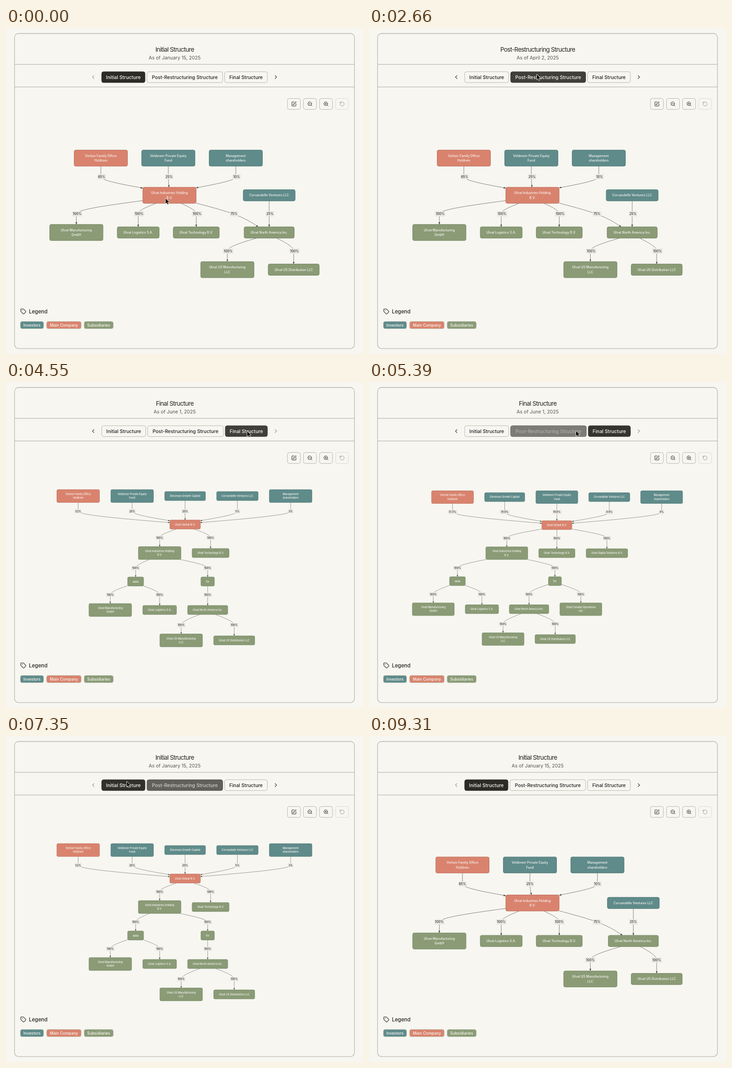
An HTML page that plays this animation: 783x715 px, repeating every 9.73 s.

```html
<!DOCTYPE html>
<html lang="en">
<head>
<meta charset="utf-8">
<title>Structure chart</title>
<style>
  html, body { margin: 0; height: 100%; overflow: hidden; background: #f7f6f1; }
  svg { display: block; width: 783px; height: 715px; font-family: Inter, sans-serif; }
  text { text-anchor: middle; }
  .icon { fill: none; stroke: #24231f; stroke-width: 2; stroke-linecap: round; stroke-linejoin: round; }
  .frame { fill: none; stroke: #b7b7ae; }
  .muted { opacity: .45; }
</style>
</head>
<body>
<svg id="stage" viewBox="0 0 783 715"></svg>
<script>
const LOOP = 9730, STEP = 70;
const PAPER = [247, 246, 241], INK = [45, 43, 38], BORDER = [183, 183, 174];
const TEAL = { fill: '#5f8b8a', edge: '#47736f' };
const CORAL = { fill: '#d9836e', edge: '#b8614d' };
const GREEN = { fill: '#8a9b76', edge: '#6c7f5a' };

const stage = document.getElementById('stage');
const $ = id => document.getElementById(id);

const text = (x, y, str, size, fill, extra = '') =>
  `<text x="${x}" y="${y + size * .364}" font-size="${size}" fill="${fill}" ${extra}>${str}</text>`;
const box = (x, y, w, h, r, extra) =>
  `<rect x="${x}" y="${y}" width="${w}" height="${h}" rx="${r}" ${extra}/>`;
const icon = (x, y, scale, body, extra = '') =>
  `<g class="icon" transform="translate(${x} ${y}) scale(${scale}) translate(-12 -12)" ${extra}>${body}</g>`;

// ---- charts ----
const NAMES = {
  family: 'Verloin Family Office|Holdrem',
  equity: 'Veldmeer Private Equity|Fund',
  growth: 'Elmorean Growth Capital',
  ventures: 'Corvandelle Ventures LLC',
  managers: 'Management|shareholders',
  global: 'Ulvat Global N.V.',
  holding: 'Ulvat Industries Holding|B.V.',
  making: 'Ulvat Manufacturing|GmbH',
  logistics: 'Ulvat Logistics S.A.',
  tech: 'Ulvat Technology B.V.',
  digital: 'Ulvat Digital Solutions B.V.',
  north: 'Ulvat North America Inc.',
  canada: 'Ulvat Canada Operations|Ltd.',
  usMaking: 'Ulvat US Manufacturing|LLC',
  usDist: 'Ulvat US Distribution LLC',
  aaaa: 'aaaa',
  for: 'for'
};
const INVESTORS = ['equity', 'growth', 'ventures', 'managers'];

// Rows hold "id centre [width]", links hold "from to percent [label x]".
const initial = (font, top, gap, nudge, shift, north) => ({
  font, top, gap, nudge, wide: 117, main: ['family', 'holding'], hub: 'holding',
  rows: [
    `family ${205 + shift}, equity ${353 + shift}, managers ${501 + shift}`,
    `holding 358.5, ventures ${north} 114`,
    `making 154.3, logistics 290 92, tech 417.3 101, north ${north} 110`,
    'usMaking 485.5, usDist 631 112'
  ],
  links: `family holding 65, equity holding 25, managers holding 10, holding making 100,
    holding logistics 100, holding tech 100, holding north 75 ${500 - nudge}, ventures north 25,
    north usMaking 100, north usDist 100`
});

const CHARTS = [
  initial(7, 267.7, 46.2, 1.7, 3, 577.2),
  {
    font: 5.6, top: 236, gap: 38.4, nudge: 0, wide: 93.5, main: ['family', 'global'], hub: 'global',
    rows: [
      'family 158.3, equity 276.7, growth 392.8 89.5, ventures 507.5 91, managers 624.3',
      'global 392.8 67',
      'holding 337, tech 448.7 81',
      'aaaa 284.3 35, for 442.3 29.5',
      'making 228.7, logistics 337 74, north 442.3 88',
      'usMaking 384.2, usDist 500.5 90'
    ],
    links: `family global 52, equity global 20, growth global 20, ventures global 5, managers global 3,
      global holding 100, global tech 100, holding aaaa 100, holding for 100, aaaa making 100,
      aaaa logistics 100, for north 100, north usMaking 100, north usDist 100`
  },
  {
    font: 5.5, top: 238.6, gap: 37.8, nudge: 0, wide: 92, main: ['family', 'global'], hub: 'global',
    rows: [
      'family 183.2, growth 297.6 88, equity 412, ventures 527 90, managers 641.8',
      'global 412 66',
      'holding 302.2, tech 412 79.5, digital 521.8 91',
      'aaaa 194 34.5, for 407.8 28.5',
      'making 141, logistics 247.6 73, north 351 86.5, canada 464.7',
      'usMaking 294, usDist 408.4 88.5'
    ],
    links: `family global 51.5, growth global 19.8, equity global 19.8, ventures global 4.9, managers global 4,
      global holding 100, global tech 100, global digital 100, holding aaaa 100, holding for 100,
      aaaa making 100, aaaa logistics 100, for north 100, for canada 100, north usMaking 100, north usDist 100`
  },
  initial(7, 265.2, 48, 0, 0, 579.8)
];

const split = list => list.split(',').map(item => item.trim().split(/\s+/));

function rim(node, p) {
  const dx = p.x - node.x, dy = p.y - node.y;
  const k = Math.min(node.w / 2 / Math.abs(dx || 1e-6), node.h / 2 / Math.abs(dy || 1e-6));
  return { x: node.x + dx * k, y: node.y + dy * k };
}

// Monotone cubic in y through three points.
function curve(a, b, c) {
  const h0 = b.y - a.y, h1 = c.y - b.y;
  const s0 = (b.x - a.x) / h0, s1 = (c.x - b.x) / h1;
  const mean = Math.abs(s0 * h1 + s1 * h0) / (h0 + h1);
  const mid = (Math.sign(s0) + Math.sign(s1)) * Math.min(Math.abs(s0), Math.abs(s1), mean / 2);
  const part = (p, q, h, m, n) =>
    `C${p.x + m * h / 3} ${p.y + h / 3} ${q.x - n * h / 3} ${q.y - h / 3} ${q.x} ${q.y}`;
  return `M${a.x} ${a.y}` + part(a, b, h0, (3 * s0 - mid) / 2, mid) + part(b, c, h1, mid, (3 * s1 - mid) / 2);
}

function drawChart(chart) {
  const { font, gap } = chart, nodes = {};
  let y = chart.top, boxes = '', lines = '', labels = '';
  for (const row of chart.rows) {
    const items = split(row);
    const height = id => font * (NAMES[id].includes('|') ? 5.05 : 3.55);
    const rowH = Math.max(...items.map(([id]) => height(id)));
    for (const [id, x, w] of items) {
      nodes[id] = { x: +x, y: y + rowH / 2, w: +w || chart.wide, h: height(id), top: y, bottom: y + rowH };
    }
    y += rowH + gap;
  }
  for (const [id, n] of Object.entries(nodes)) {
    const tone = chart.main.includes(id) ? CORAL : INVESTORS.includes(id) ? TEAL : GREEN;
    boxes += box(n.x - n.w / 2, n.y - n.h / 2, n.w, n.h, font * .5,
      `fill="${tone.fill}" stroke="${tone.edge}" stroke-width="${font * .12}"`);
    const parts = NAMES[id].split('|');
    parts.forEach((part, i) => {
      boxes += text(n.x, n.y + (i - (parts.length - 1) / 2) * font * 1.5, part, font, '#f8f7f2', 'font-weight="500"');
    });
  }
  for (const [from, to, percent, at] of split(chart.links)) {
    const a = nodes[from], b = nodes[to];
    const mid = { x: +at || (to === chart.hub ? a : b).x, y: (a.bottom + b.top) / 2 };
    lines += `<path d="${curve(rim(a, mid), mid, rim(b, mid))}" fill="none" stroke="#5b5a55"
      stroke-width="${font * .11}" marker-end="url(#tip)"/>`;
    const label = percent + '%', w = (label.length * .62 + .75) * font, x = mid.x + chart.nudge;
    labels += box(x - w / 2, mid.y - font * .82, w, font * 1.64, 0, 'fill="#eae9e3"') +
      text(x, mid.y, label, font, '#2f2e2a', 'font-weight="500"');
  }
  return `<g class="chart">${lines}${boxes}${labels}</g>`;
}

// ---- fixed parts ----
const HEADS = [
  ['Initial Structure', 'As of January 15, 2025', 97.5],
  ['Post-Restructuring Structure', 'As of April 2, 2025', 167],
  ['Final Structure', 'As of June 1, 2025', 94.8]
];
const LENS = '<circle cx="11" cy="11" r="8"/><path d="M21 21l-4.35-4.35M8 11h6"/>';
const TOOLS = [
  `<path d="M12 3H5a2 2 0 0 0-2 2v14a2 2 0 0 0 2 2h14a2 2 0 0 0 2-2v-7M18.375 2.625a1 1 0 0 1 3 3l-9.013 9.014a2 2 0 0 1-.853.505l-2.873.84a.5.5 0 0 1-.62-.62l.84-2.873a2 2 0 0 1 .506-.852z"/>`,
  LENS,
  LENS + '<path d="M11 8v6"/>',
  '<path d="M3 12a9 9 0 1 0 9-9 9.75 9.75 0 0 0-6.74 2.74L3 8M3 3v5h5"/>'
];
const CHIPS = [['Investors', 31.5, 51, TEAL], ['Main Company', 89, 76, CORAL], ['Subsidiaries', 171.3, 64, GREEN]];

stage.innerHTML = `
  <defs><marker id="tip" viewBox="0 0 10 10" refX="9.5" refY="5" markerWidth="6.5" markerHeight="6.5" orient="auto">
    <path d="M0 1L10 5L0 9z" fill="#4a4944"/></marker></defs>
  ${box(18.7, 12, 745.6, 691.2, 9, 'class="frame" stroke-width="1.3"')}
  <path class="frame" d="M19 79.7H764M19 129.4H764" stroke-width="1.2"/>
  ${text(370, 46.7, '', 13.5, '#24231f', 'id="title" letter-spacing="-.05em"')}
  ${text(370, 65.6, '', 10.5, '#55544f', 'id="date"')}
  ${icon(191.3, 107.7, .56, '<path d="M15 18l-6-6 6-6"/>', 'id="prev"')}
  ${icon(591.8, 107.7, .56, '<path d="M9 18l6-6-6-6"/>', 'id="next"')}
  ${box(208.4, 94.4, 98.4, 26.8, 5, 'id="ring" fill="none" stroke="#a3a299" stroke-width="2"')}
  ${HEADS.map(([name], i) => `<g id="tab${i}">${box(0, 95.9, 10, 23.8, 4, '')}${
    text(0, 107.7, name, 10.5, '#000', 'font-weight="500"')}</g>`).join('')}
  ${TOOLS.map((body, i) => `<g ${i === 3 ? 'class="muted"' : ''}>${
    box(617.3 + 35.2 * i, 154.6, 28.4, 24, 4, 'class="frame"')}${icon(631.5 + 35.2 * i, 166.6, .5, body)}</g>`).join('')}
  ${CHARTS.map(drawChart).join('')}
  ${icon(38, 621.6, .56, `<path d="M12.586 2.586A2 2 0 0 0 11.172 2H4a2 2 0 0 0-2 2v7.172a2 2 0 0 0 .586 1.414l8.704 8.704a2.426 2.426 0 0 0 3.42 0l6.58-6.58a2.426 2.426 0 0 0 0-3.42z"/><circle cx="7.5" cy="7.5" r=".6"/>`)}
  ${text(70.6, 621.5, 'Legend', 11.4, '#24231f', 'font-weight="500"')}
  ${CHIPS.map(([name, x, w, tone]) => box(x, 643.6, w, 16, 4, `fill="${tone.fill}" stroke="#bfc5b8"`) +
    text(x + w / 2, 651.6, name, 8.6, '#f8f7f2', 'font-weight="500"')).join('')}
  <path id="cursor" d="M0 0V11.2L2.6 8.8L4.3 12.8L6.3 12L4.6 8H8.2Z" fill="#111" stroke="#fff"
    stroke-width="1.5" stroke-linejoin="round" paint-order="stroke"/>`;

// ---- timeline ----
const PAGES = [[0, 0], [2450, 1], [4410, 2], [5810, 1], [7350, 0]];
const VIEWS = [[0, 0], [2800, 1], [4690, 2], [6090, 1], [7700, 3]];
// Tab darkness: 0 idle, 1 filled, .9 filled under the pointer.
const SHADES = [
  [[0, 1], [2400, 1], [2600, 0], [6820, 0], [6970, 1], [7300, 1], [7490, .9], [8560, .9], [8710, 1]],
  [[0, 0], [1700, 0], [1870, 1], [2400, 1], [2600, .9], [3320, .9], [3470, 1], [4360, 1], [4540, 0],
    [5300, 0], [5450, 1], [5760, 1], [5940, .9], [6810, .9], [6960, 1], [7300, 1], [7490, 0]],
  [[0, 0], [3840, 0], [3990, 1], [4360, 1], [4540, .9], [5310, .9], [5460, 1], [5760, 1], [5940, 0]]
];
const POINTER = [
  [0, 350, 374], [280, 350, 374], [1190, 368, 102], [3010, 368, 102], [3780, 534, 121], [3990, 529, 108],
  [5110, 529, 108], [5670, 429, 107], [6510, 429, 107], [7140, 265, 100], [8470, 265, 100], [9310, 340, 735]
];

const held = (keys, t) => keys.filter(k => k[0] <= t).pop()[1];
const easeOut = u => u * (2 - u);
function track(keys, t, col, ease = u => u) {
  const i = keys.findIndex(k => k[0] > t);
  if (i < 0) return keys[keys.length - 1][col];
  const a = keys[i - 1], b = keys[i];
  return a[col] + (b[col] - a[col]) * ease((t - a[0]) / (b[0] - a[0]));
}
const mix = (a, b, u) => `rgb(${a.map((v, i) => Math.round(v + (b[i] - v) * u))})`;

const charts = [...document.querySelectorAll('.chart')];

function render(t) {
  const page = held(PAGES, t), view = held(VIEWS, t);
  $('title').textContent = HEADS[page][0];
  $('date').textContent = HEADS[page][1];
  $('prev').style.opacity = page === 0 ? .5 : 1;
  $('next').style.opacity = page === 2 ? .5 : 1;
  charts.forEach((g, i) => g.style.display = i === view ? '' : 'none');

  let x = 209.4;
  HEADS.forEach(([, , full], i) => {
    const w = full - (i === page ? 1.5 : 0), shade = track(SHADES[i], t, 1);
    const [rect, label] = $('tab' + i).children;
    rect.setAttribute('x', x + .5);
    rect.setAttribute('width', w - 1);
    rect.setAttribute('fill', mix(PAPER, INK, shade));
    rect.setAttribute('stroke', mix(shade > .8 ? PAPER : BORDER, INK, shade));
    label.setAttribute('x', x + w / 2);
    label.setAttribute('fill', mix([34, 33, 30], PAPER, Math.min(1, shade * 1.1)));
    x += w + 3.3;
  });

  $('ring').style.opacity = t < 1470 || t >= 2100 ? 0 : t < 1540 ? .5 : 1;
  $('cursor').setAttribute('transform',
    `translate(${track(POINTER, t, 1, easeOut)} ${track(POINTER, t, 2, easeOut)})`);
}

const start = performance.now();
function tick() {
  const t = (performance.now() - start) % LOOP;
  render(Math.floor(t / STEP) * STEP);
  requestAnimationFrame(tick);
}
tick();
</script>
</body>
</html>
```
